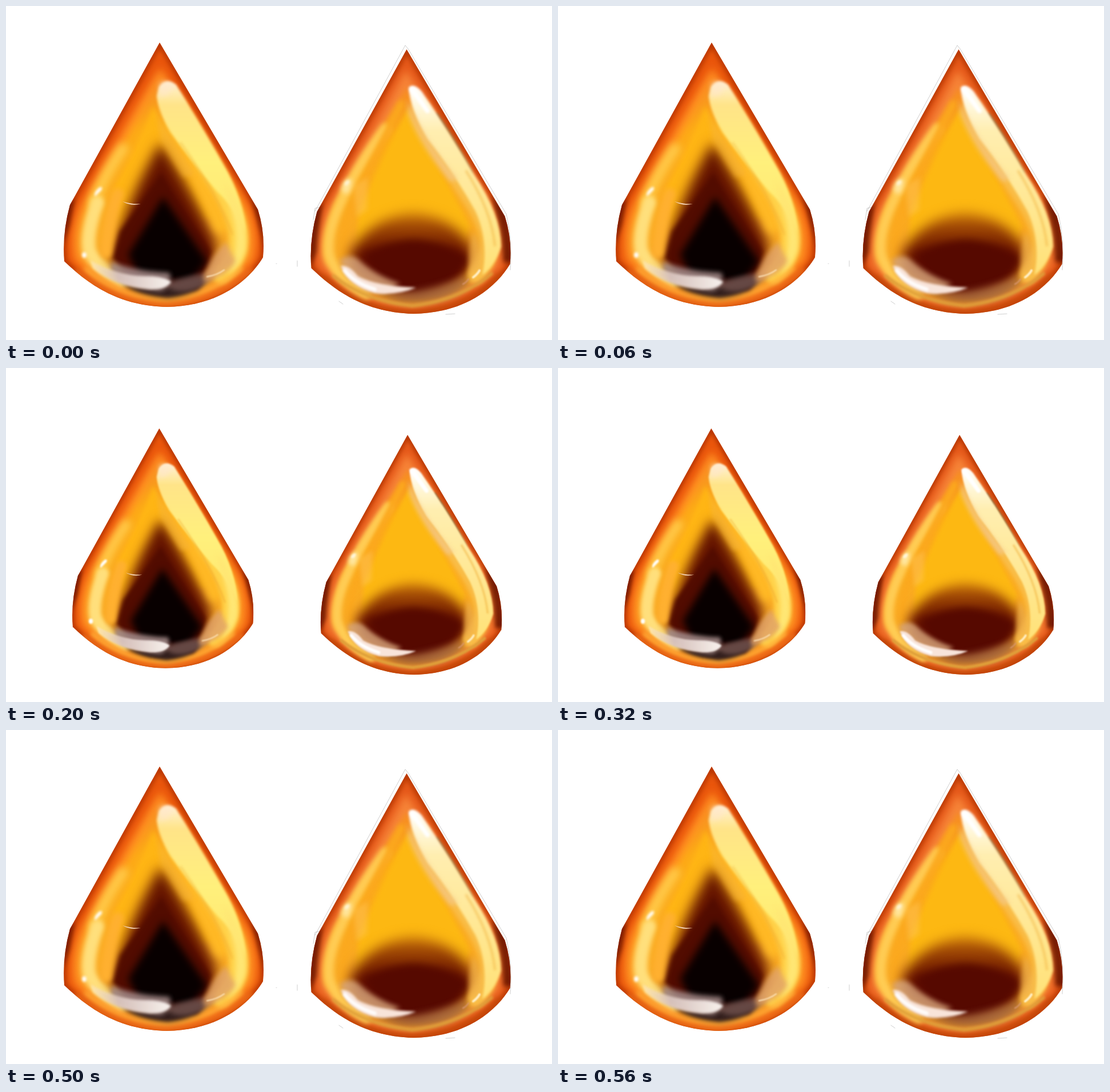
These frames come from a looping animation (956x586 px, 600 ms). An HTML page:

```html
<!DOCTYPE html>
<html lang="en">
<head>
<meta charset="utf-8">
<title>Amber drops</title>
<style>
  html, body { margin: 0; width: 100%; height: 100%; overflow: hidden; background: #fff; }
  svg { display: block; width: 956px; height: 586px; }
  .line { fill: none; stroke-linecap: round; stroke-linejoin: round; }
  .b1 { filter: blur(1px); }
  .b2 { filter: blur(2px); }
  .b4 { filter: blur(4px); }
  .b7 { filter: blur(7px); }
  .b11 { filter: blur(11px); }
</style>
</head>
<body>
<svg viewBox="0 0 956 586">
  <defs>
    <path id="shape" d="M269 64L441 357Q454 398 450 441C428 478 375 527 281 528C200 526 148 492 102 448Q98 400 112 349Z"/>
    <clipPath id="clipL"><use href="#shape"/></clipPath>
    <clipPath id="clipR"><use href="#shape" x="432.5" y="12"/></clipPath>
    <linearGradient id="amber" x1="0" y1="0" x2="0" y2="1">
      <stop offset="0" stop-color="#f58a25"/>
      <stop offset=".25" stop-color="#fdab16"/>
      <stop offset="1" stop-color="#f9ac2c"/>
    </linearGradient>
    <linearGradient id="pool" gradientUnits="userSpaceOnUse" x1="0" y1="360" x2="0" y2="440">
      <stop offset="0" stop-color="#d07c0c"/>
      <stop offset=".35" stop-color="#9c4404"/>
      <stop offset="1" stop-color="#641000"/>
    </linearGradient>
    <linearGradient id="gloss" gradientUnits="userSpaceOnUse" x1="0" y1="130" x2="0" y2="420">
      <stop offset="0" stop-color="#fff3dc"/>
      <stop offset=".15" stop-color="#ffe488"/>
      <stop offset=".5" stop-color="#fff07c"/>
      <stop offset="1" stop-color="#ffe56c"/>
    </linearGradient>
    <linearGradient id="cream" gradientUnits="userSpaceOnUse" x1="0" y1="140" x2="0" y2="460">
      <stop offset="0" stop-color="#fff"/>
      <stop offset=".25" stop-color="#ffeeb0"/>
      <stop offset="1" stop-color="#ffe27a"/>
    </linearGradient>
    <linearGradient id="shine" gradientUnits="userSpaceOnUse" x1="150" y1="0" x2="285" y2="0">
      <stop offset="0" stop-color="#ffe6ac"/>
      <stop offset=".35" stop-color="#d9c4bf"/>
      <stop offset="1" stop-color="#fffaf6"/>
    </linearGradient>
  </defs>

  <g id="left">
    <g clip-path="url(#clipL)">
      <use href="#shape" fill="#ea560c"/>
      <use href="#shape" class="line b4" stroke="#b43400" stroke-width="9"/>
      <path class="b4" fill="#7c1c00" d="M100 345L120 338L112 385L98 420ZM428 330L446 356L456 430L442 385Z"/>
      <path class="b7" fill="#ff8a20" d="M270 108Q350 235 420 345Q446 395 434 445Q380 512 280 520Q180 512 119 445Q110 400 130 352Q200 220 270 108Z"/>
      <path class="b7" fill="url(#amber)" d="M270 122Q340 230 400 325Q430 390 421 440Q370 502 280 512Q190 502 132 440Q120 400 146 338Q215 230 270 122Z"/>
      <path class="b4" fill="#ffb514" d="M258 175L295 250L365 370L200 400L188 320Q230 245 258 175Z"/>
      <path class="line b7" stroke="#ffcb4a" stroke-width="18" d="M205 250Q170 300 154 345"/>
      <path class="line b4" stroke="#ffdf7c" stroke-width="24" d="M160 345Q140 400 146 430Q160 460 205 482"/>

      <!-- dark core -->
      <path class="b11" fill="#651400" d="M270 240Q315 305 368 415L365 462L300 500L215 480L184 445Q212 340 270 240Z"/>
      <path class="b4" fill="#520c00" d="M272 292L358 430L335 500L220 485L187 442L200 395L225 360Z"/>
      <path class="b7" fill="#080000" d="M275 335L352 448L322 488L232 474L214 436Z"/>
      <path class="line b4" stroke="#ffb030" stroke-width="20" d="M196 330Q180 375 175 432"/>

      <!-- right sheen -->
      <path class="line b7" stroke="#ffb925" stroke-width="26" d="M290 210Q348 315 377 385"/>
      <path class="line b4" stroke="#ffd24a" stroke-width="32" d="M292 170Q326 242 376 320Q410 380 406 415Q402 450 378 472"/>
      <path class="b2" fill="url(#gloss)" d="M268 142Q280 124 298 138Q340 205 380 276Q418 340 419 400Q404 358 370 326Q324 272 288 222Q266 185 264 158Z"/>
      <path class="b4" fill="#ffe674" d="M380 305Q428 370 420 430Q408 462 388 474Q408 430 400 382Z"/>
      <path class="b4" fill="#f6b33c" opacity=".5" d="M262 180L276 210L330 296L310 300L270 235Z"/>
      <path class="b4" fill="#ffe6cc" opacity=".6" d="M268 136Q280 126 294 140L284 156L268 160Z"/>
      <path class="line b2" stroke="#f0a830" stroke-width="3" opacity=".45" d="M306 240Q370 330 396 400"/>

      <!-- base and lower gloss -->
      <path class="b4" fill="#34201e" d="M204 488Q260 499 300 482Q330 472 352 476Q344 506 286 516Q232 510 204 488Z"/>
      <path class="b4" fill="#8f6a64" opacity=".55" d="M278 486Q325 472 368 464Q362 492 318 500Q290 504 278 486Z"/>
      <path class="b4" fill="#e1a368" opacity=".85" d="M385 414Q356 442 345 483Q382 478 402 448Z"/>
      <path class="line b4" stroke="#ffb23a" stroke-width="7" d="M140 462Q195 512 282 518Q350 512 412 462"/>
      <path class="line b4" stroke="#f0701a" stroke-width="8" d="M124 466Q190 522 281 525Q370 518 428 464"/>
      <path class="b4" fill="#a08886" opacity=".9" d="M184 448Q225 466 286 468Q294 490 270 500Q215 495 184 470Z"/>
      <path class="b2" fill="url(#shine)" opacity=".92" d="M148 446Q190 472 242 474Q276 474 289 484Q280 498 252 497Q190 492 152 460Z"/>
      <path class="b2" fill="#fff" d="M156 334Q152 328 164 318Q170 316 167 323Z"/>
      <ellipse class="b2" cx="137" cy="437" rx="4" ry="5" fill="#fff"/>
      <path fill="#f7d6bd" d="M204 343Q219 348 236 347Q220 352 204 343Z"/>
      <path class="line b1" stroke="#ffe6bd" stroke-width="2" d="M352 475Q370 472 382 463"/>
    </g>
  </g>

  <g id="right">
    <g id="sketch" class="line" stroke="#777" stroke-width=".7" opacity=".5">
      <path d="M541 360L699 69L704 75L876 365Q887 410 883 463M538 375L541 355L549 353M510 447V457M473 452h1M770 541L786 540M583 518L590 523"/>
    </g>
    <g clip-path="url(#clipR)">
      <use href="#shape" x="432.5" y="12" fill="#e6591a"/>
      <use href="#shape" x="432.5" y="12" class="line b4" stroke="#b43600" stroke-width="9"/>
      <path class="b4" fill="#741a00" d="M530 365L554 345L546 430L530 460ZM850 330L878 362L890 450L870 450Z"/>
      <path class="b7" fill="#f68438" d="M700 112Q770 222 842 335Q876 400 863 455Q808 522 712 532Q610 522 551 455Q542 410 562 360Q635 230 700 112Z"/>
      <path class="b4" fill="url(#amber)" d="M701 142Q770 250 830 345Q868 410 852 455Q800 514 712 524Q618 516 560 450Q548 415 576 345Q640 245 701 142Z"/>
      <path class="line b4" stroke="#ffcc54" stroke-width="18" d="M664 215Q612 285 586 345Q560 400 566 438Q580 480 630 508"/>
      <path class="line b4" stroke="#fba81e" stroke-width="12" d="M692 172Q640 275 608 350Q588 396 592 432"/>
      <path class="b4" fill="#fdb812" d="M704 178L812 385L800 425H612L618 360Q660 260 704 178Z"/>

      <!-- dark pool -->
      <path class="b11" fill="url(#pool)" d="M602 432Q645 368 712 364Q778 368 814 420Q824 460 790 488Q745 512 700 512Q650 505 606 464Z"/>
      <path class="b7" fill="#560900" d="M625 436Q665 412 715 410Q775 414 808 442Q798 484 720 502Q655 495 625 436Z"/>
      <path class="b7" fill="#a26645" opacity=".75" d="M650 505Q730 507 808 474Q820 492 768 514Q700 528 650 505Z"/>

      <!-- right sheen -->
      <path class="line b2" stroke="#8a5420" stroke-width="5" d="M754 190Q790 242 814 292"/>
      <path class="line b4" stroke="#f9bd48" stroke-width="30" d="M726 180Q764 265 812 335Q850 390 844 425Q838 455 824 472"/>
      <path class="b2" fill="url(#cream)" d="M705 143Q714 134 728 150Q780 226 820 296Q866 365 867 422Q857 456 834 472Q846 412 822 360Q784 292 738 234Q708 184 705 143Z"/>
      <path class="b4" fill="#f4c98e" opacity=".7" d="M704 164Q728 230 792 304L778 308Q726 248 704 190Z"/>
      <path class="line b2" stroke="#f0b03c" stroke-width="4" opacity=".5" d="M806 290Q850 360 856 420"/>
      <path class="b4" fill="#f0b04c" opacity=".7" d="M818 395Q836 420 828 460L812 472Q808 440 818 395Z"/>
      <path class="line b2" stroke="#fff" stroke-width="8" d="M711 147Q724 164 738 184"/>

      <!-- lower gloss -->
      <path class="line b2" stroke="#dfa03a" stroke-width="6" d="M574 474Q630 518 712 526Q790 518 850 470"/>
      <path class="line b4" stroke="#c44907" stroke-width="7" d="M556 475Q620 535 712 538Q808 530 864 472"/>
      <path class="b4" fill="#d6a57d" opacity=".8" d="M585 446Q604 430 623 450Q650 474 690 487L660 504Q605 490 585 448Z"/>
      <path class="b2" fill="#f8e4da" d="M586 456Q600 453 616 474Q646 491 718 494Q686 508 646 504Q600 492 586 456Z"/>
      <path class="line b2" stroke="#fff" stroke-width="6" d="M593 464Q610 486 646 497"/>
      <path class="b4" fill="#ffe7a0" d="M588 326Q586 308 602 302Q611 309 598 330Z"/>
      <path class="b2" fill="#fff5d8" d="M592 314Q594 304 602 306Q600 317 592 314Z"/>
      <path class="b4" fill="#ffc455" opacity=".5" d="M608 315L634 300L632 358L614 370Z"/>
      <path class="line b1" stroke="#fff0c8" stroke-width="4" d="M818 476Q826 470 829 464"/>
      <path class="line b1" stroke="#d89672" stroke-width="2" d="M800 488Q806 485 810 479"/>
    </g>
  </g>
</svg>
<script>
  const find = id => document.getElementById(id);
  const drops = [[find("left"), 262, 515], [find("right"), 719, 520]];
  const sketch = find("sketch");
  let shown;

  // Both drops shrink in hard steps, hold, and grow back.
  const scaleAt = ms => {
    if (ms < 100 || ms >= 500) return 1;
    return ms >= 200 && ms < 400 ? 0.907 : 0.963;
  };

  function draw() {
    const s = scaleAt(performance.now() % 600);
    if (s !== shown) {
      shown = s;
      for (const [drop, x, y] of drops)
        drop.setAttribute("transform", `translate(${x * (1 - s)} ${y * (1 - s)}) scale(${s})`);
      sketch.setAttribute("visibility", s === 1 ? "visible" : "hidden");
    }
    requestAnimationFrame(draw);
  }
  draw();
</script>
</body>
</html>
```
